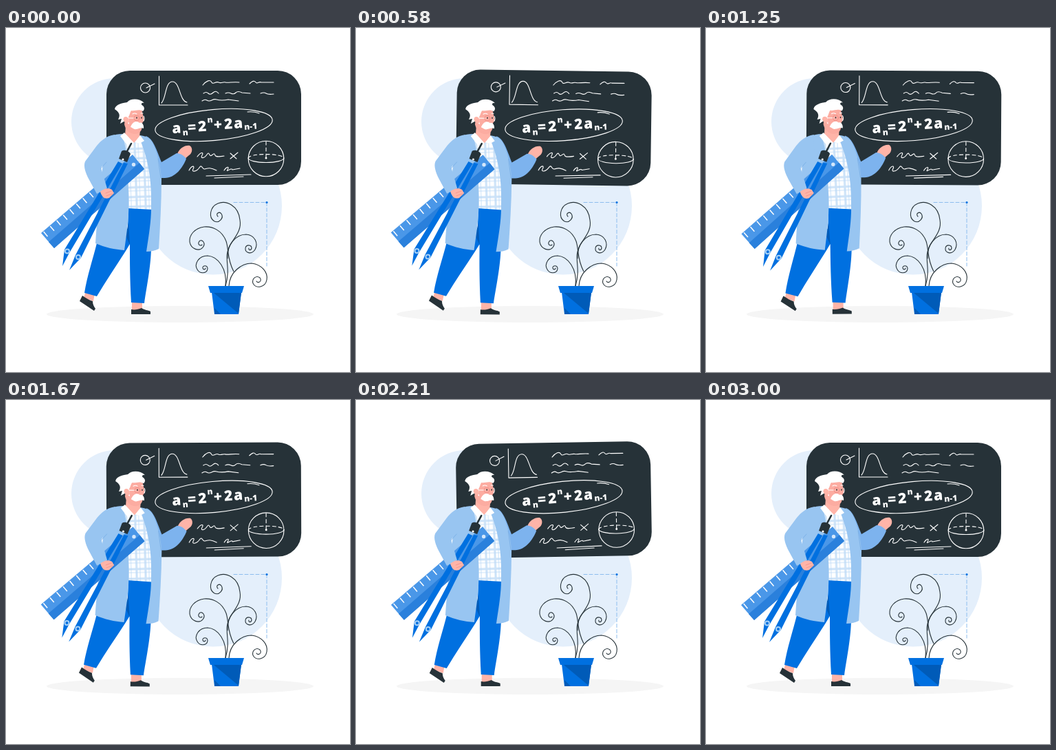
These frames come from a looping animation (500 by 500 pixels, 3040 ms). An HTML page:

```html
<!DOCTYPE html>
<html lang="en">
<head>
<meta charset="utf-8">
<title>Maths teacher</title>
<style>
html, body { margin: 0; width: 100%; height: 100%; overflow: hidden; background: #fff; }
svg { display: block; width: 100vw; height: 100vh; }
.line { fill: none; stroke-linecap: round; stroke-linejoin: round; }
.blue { fill: #0070e0; }
.coat { fill: #98c5f1; }
.skin { fill: #ffb4a8; }
.dark { fill: #263238; }
.white { fill: #fff; }
text { font: 800 21px "Open Sans", Inter, sans-serif; fill: #fff; }
.small { font-size: 12px; }
</style>
</head>
<body>
<svg viewBox="0 0 500 500">
  <defs>
    <pattern id="plaid" width="13" height="14" x="178" y="164" patternUnits="userSpaceOnUse" patternTransform="rotate(-2)">
      <path fill="#fff" d="M0 0H13V14H0Z"/>
      <path stroke="#b9d8f6" stroke-width="3" opacity=".75" d="M3 0V14M0 4H13"/>
      <path stroke="#b9d8f6" stroke-width=".8" d="M8 0V14M0 9H13"/>
    </pattern>
  </defs>

  <g fill="#e4effb">
    <circle cx="158" cy="136" r="63"/>
    <circle cx="301" cy="258.500" r="100"/>
  </g>
  <ellipse cx="253" cy="416" rx="194" ry="12" fill="#f5f5f5"/>

  <!-- plant -->
  <path class="line" stroke="#8dbdee" stroke-dasharray="5 3" d="M331 253.5H379V346"/>
  <circle class="blue" cx="379" cy="253.5" r="1.6"/>
  <g class="line" stroke="#263238" stroke-width="1.1">
    <path d="M319 375C328 345 314 335 327 313C338 298 342 290 340 279C338 258 320 250 308 255C296 260 294 276 303 281C310 284 317 276 313 270C310 266 304 270 308 274"/>
    <path d="M331 354C321 335 324 322 320 310C314 294 300 288 288 289C274 291 266 301 267 311C269 322 281 325 286 319C291 313 285 306 281 310C278 314 282 318 285 315"/>
    <path d="M322 335C321 315 334 300 349 300C362 301 367 313 362 322C357 330 347 327 348 320C349 314 357 315 357 320C356 324 352 323 353 320"/>
    <path d="M319 375C322 350 308 332 293 331C280 331 273 343 278 351C282 358 292 357 293 350C293 344 285 345 286 349C287 352 290 351 290 349"/>
    <path d="M324 375C325 355 342 342 357 342C372 344 381 355 379 366C377 377 363 380 359 371C357 364 364 359 369 363C373 368 366 372 364 368"/>
  </g>
  <path class="blue" d="M299 384H342L338 416H303Z"/>
  <path fill="#005bb8" d="M302 385H342L338 415Z"/>
  <path fill="#005bb8" d="M303 407L312 416H303Z"/>
  <path class="blue" d="M294 375H346L343 385H297Z"/>

  <g id="board">
    <rect class="dark" x="146" y="62" width="283" height="166" rx="34"/>
    <g class="line" stroke="#fff" stroke-width="1.1">
      <circle cx="202.500" cy="87" r="7"/>
      <path d="M204 87L216 81M222.500 70V112H264"/>
      <path d="M226 109C233 102 231 78 242 78C253 78 252 106 263 108"/>
      <path d="M286 83C291 77 297 74 299 79C301 83 305 77 309 79S315 78 319 79S330 78 339 79"/>
      <path d="M354 81C358 77 361 76 363 79S368 77 371 79L389 79"/>
      <path d="M287 95Q291 92 294 95T301 94T309 95M319 95Q323 93 327 95T334 94T343 94L355 95M370 95Q375 93 378 95T389 96"/>
      <path d="M285 106Q289 103 292 105T299 105T306 104T314 105T323 104L338 106"/>
      <ellipse cx="302" cy="141" rx="85.500" ry="22.500" transform="rotate(-5 302 141)"/>
      <path d="M351 122Q360 121 368 124"/>
      <path d="M278 187C283 180 288 180 285 185S288 190 292 184S295 188 299 185S303 182 304 185S311 187 317 186M326 182L335 190M337 181L326 190"/>
      <path d="M266 207C270 199 275 200 272 205S277 209 281 203S285 206 289 205S296 202 306 207M317 207C321 201 325 201 322 206S328 202 329 206T340 204"/>
      <path d="M291 215L356 213M303 218L345 216"/>
      <circle cx="378" cy="190" r="25.800"/>
      <path d="M352.200 189A25.800 6.500 0 0 0 403.800 189"/>
      <path stroke-dasharray="5 4" d="M352.200 189A25.800 5.500 0 0 1 403.800 189M378 165V188"/>
    </g>
    <circle class="white" cx="378" cy="189" r="1.500"/>
    <g transform="rotate(-4 302 141)">
      <text y="149" x="241">a</text>
      <text y="149" x="264">=</text>
      <text y="149" x="279">2</text>
      <text y="148" x="302">+</text>
      <text y="148" x="317">2</text>
      <text y="148" x="331">a</text>
      <text class="small" y="153" x="256">n</text>
      <text class="small" y="137" x="293">n</text>
      <text class="small" y="151" x="346">n-1</text>
    </g>
  </g>

  <g id="man">
    <!-- shoes and legs -->
    <path class="skin" d="M116 382L129 386L127 397L113 392ZM183 397H198V410H183Z"/>
    <path class="dark" d="M111 389C116 392 121 396 126 397C126 402 128 405 130 408L128 411L107 397Z"/>
    <path class="dark" d="M182 409C187 410 192 409 197 407C201 410 206 410 210 412V416H182Z"/>
    <path class="blue" d="M178 260H213L211 318C211 345 204 378 201 400L182 399C180 365 180 340 180 314L174 324C160 346 145 368 132 390L114 385C118 360 126 337 133 309L177 292Z"/>
    <path fill="#005bb8" d="M178 283L174 302L180 315Z"/>

    <!-- raised arm -->
    <path class="skin" d="M249 183C252 175 260 170 267 171C272 174 271 182 266 185L259 191Z"/>
    <path fill="#7db3ee" d="M203 157C214 160 219 178 226 195L248 182C254 182 259 186 262 190C257 203 246 218 231 218H216Z"/>

    <!-- shirt and coat -->
    <path fill="url(#plaid)" d="M168 158L199 159L212 200V264L177 262Z"/>
    <path class="coat" d="M169 154C157 154 148 158 143 169L138 230C134 255 132 284 130 313C144 319 158 322 172 323C176 294 180 269 178 235C177 207 177 181 169 154Z"/>
    <path class="coat" d="M192 156C204 156 211 161 214 169C220 181 225 202 226 219C226 253 224 288 222 321Q214 325 204 325C208 299 211 280 211 262C212 224 208 191 192 156Z"/>
    <path class="line" stroke="#76ade5" stroke-width=".8" d="M221 190L225 218M145 249L140 270"/>
    <path class="skin" d="M174 142L195 148L194 160L186 167L173 157Z"/>
    <path class="white" d="M172 152L186 167L176 170L166 157ZM195 156L201 164L194 168L187 166Z"/>

    <!-- head -->
    <path fill="#fcaca1" d="M175 119L197 117C198 122 199 127 201 134L198 138C199 146 196 153 189 154C181 155 174 149 172 140Z"/>
    <path class="white" d="M158 118C159 111 169 109 176 108C181 102 194 102 201 109C197 108 195 111 199 113C202 116 201 119 199 121C193 117 188 121 182 120C180 123 180 126 178 129L179 140L173 135L166 139L168 132L163 133C167 126 164 122 158 118Z"/>
    <path class="skin" d="M178 131C173 126 168 131 172 136C174 139 178 139 179 136Z"/>
    <path class="white" d="M181 144C184 136 190 134 194 138C198 136 201 142 200 146C196 144 193 147 189 147C186 148 184 145 181 144Z"/>
    <path class="line" stroke="#fff" stroke-width="1.100" d="M184 125Q187 123 190 125M196 124L199 124M178 131H187M200 128Q202 131 200 135"/>
    <circle class="line" cx="190" cy="131" r="4" stroke="#ef8b84" stroke-width=".9"/>
    <path class="line" stroke="#263238" stroke-width="1.500" d="M190 130V131M197 130V131"/>

    <!-- ruler -->
    <path fill="#4a97e8" d="M51 298L184 184L201 205L70 320Z"/>
    <path fill="#2a80dc" d="M62 311L194 196L201 205L70 320Z"/>
    <path class="line" stroke="#fff" stroke-width="9" stroke-dasharray="1.5 11" style="stroke-linecap:butt" d="M57 300L140 229"/>
    <circle cx="185.500" cy="198.500" r="2.700" fill="#d4e7fb"/>

    <!-- compass -->
    <path class="blue" d="M163 194L169 197L92 327L82 346L85 322ZM171 196L177 197L109 334L92 352L101 330Z"/>
    <path class="line" stroke="#263238" stroke-width="2.600" d="M175 181L182 168"/>
    <g fill="#0070e0" stroke="#a5cff6" stroke-width="2">
      <circle cx="89" cy="324.500" r="3"/><circle cx="105" cy="333" r="3"/>
    </g>
    <path class="dark" d="M168 179C172 176 179 179 181 183L176 195L164 190Z"/>
    <circle class="white" cx="170" cy="191" r="1.500"/>

    <!-- holding arm -->
    <path class="coat" d="M158 155C145 157 138 164 132 171L115 194C112 201 116 211 120 219L132 241L147 233L138 203L158 180Z"/>
    <path class="line" stroke="#76ade5" stroke-width=".8" d="M138 204L146 195"/>
    <path class="skin" d="M137 238C142 233 149 232 154 235L157 240L150 247C144 249 140 247 137 238Z"/>
    <path class="line" stroke="#ef8b84" stroke-width=".7" d="M145 240L153 237M146 244L154 241"/>
  </g>
</svg>
<script>
const LOOP = 3040, FRAME = 1000 / 24;
const board = document.getElementById("board");
const man = document.getElementById("man");

// Triangle wave: 0, 1 at a quarter, -1 at three quarters, back to 0.
function sway(t, period) {
  const p = t / period % 1;
  return p < .25 ? 4 * p : p < .75 ? 2 - 4 * p : 4 * p - 4;
}

function draw(now) {
  const step = Math.floor((now % LOOP + 5) / FRAME);
  const t = Math.min(step, 72) * FRAME;
  board.setAttribute("transform", `rotate(${sway(t, 3000)} 287.5 145)`);
  man.setAttribute("transform", `rotate(${sway(t, 1500)} 161 260)`);
}

const start = performance.now();
function tick() {
  draw(performance.now() - start);
  requestAnimationFrame(tick);
}
tick();
</script>
</body>
</html>
```
